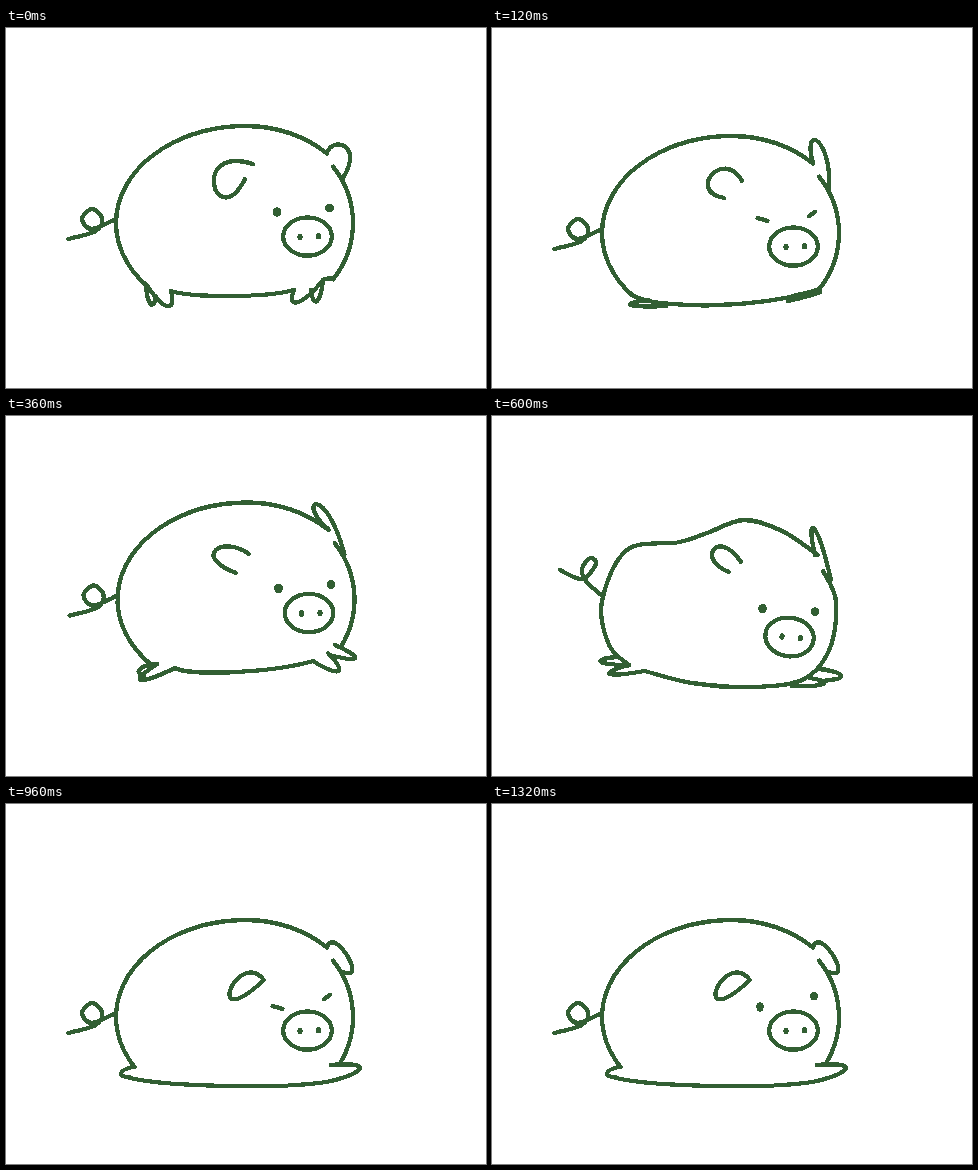
An HTML page with a canvas that plays this animation: 480 by 360 pixels, repeating every 1920 ms.

```html
<!DOCTYPE html>
<html lang="en">
<head>
<meta charset="utf-8">
<title>Resting pig</title>
<style>
  html, body { margin: 0; width: 100%; height: 100%; overflow: hidden; background: #fff; }
  canvas { display: block; width: 480px; height: 360px; }
</style>
</head>
<body>
<canvas id="stage" width="480" height="360"></canvas>
<script>
const ctx = document.getElementById('stage').getContext('2d', { willReadFrequently: true });
const INK = '#325f33';
const LOOP = 1920;
const TOP = 1.5 * Math.PI;
const SNOUT = [301.5, 208.5];
const EYES = [271, 184, 323.5, 180];
const TAIL = [62,211, 90,203, 96,190, 86,181, 76,191, 86,201, 110,191];

// shift: body offset; span: angles where the body outline meets the feet.
// ear: cubic; farEar: the two controls between fixed roots; feet: bows on the stage.
const stand = {
  shift: [0, 0], span: [2.45, 0.62],
  ear: [247,136, 183,116, 210,207, 239,151],
  farEar: [326,108, 358,116],
  feet: [
    [140,257, 144.5,276, 150,268], [141,257, 161,278, 165,263],
    [165,263, 225,268, 288,262],
    [288,262, 292,274, 317,252], [305,262, 311,273, 317,252], [327,251, 322,250.5, 317,252]
  ]
};
const crouch = {
  shift: [0, 10], span: [2.45, 0.62],
  ear: [250,143, 232,110, 194,153, 232,160],
  farEar: [310,84, 340,101],
  eyes: [270.5,181.5, 320,176], shut: true,
  feet: [
    [140,267, 225,277, 327,261],
    [156,272, 139,277, 174,278], [296,273, 328,264, 304,267]
  ]
};
const leap = {
  shift: [1.5, -11.5], span: [2.41, 0.5],
  ear: [241.5,149.5, 215,130, 184,152, 228.5,168.5],
  farEar: [287,96, 318,78],
  feet: [
    [151,248, 134,253, 138,260], [151,248, 135,264, 169,252],
    [169,252, 230,256, 307,245],
    [307,245, 332,255, 322,237], [324,239, 349,242, 329,229]
  ]
};
const land = {
  shift: [2, 14],
  outline: [
    [326,139, 290,115, 252,104, 215,117, 188,126, 135,134, 110,185, 117,229, 137,249],
    [153,255, 200,267, 262,271, 312,263, 338,232, 344,185, 331,155],
    [68,154, 90,163, 104,148, 98,142, 90,153, 94,165, 109,179]
  ],
  ear: [247,132, 225,98, 201,129, 235,142],
  farEar: [311,82, 323,89],
  head: [-6, -1.5], tilt: 0.133,
  feet: [
    [124,241, 109,246, 137,249], [137,249, 118,258, 153,255],
    [328,253, 349,260, 328,265], [300,270, 331,268, 318,262]
  ]
};
const flat = {
  shift: [0, 18], span: [2.6, 0.51],
  ear: [256,158, 238,143, 217,155, 250,167],
  farEar: [308,105, 325,94],
  eyes: [271.5,185.5, 321,175], shut: true,
  feet: [
    [127,263, 115,269, 124,273.5], [124,274, 225,282, 325,277],
    [325,277, 354,264, 325,261]
  ]
};
const settle = { ...flat, ear: [258,158, 231,125, 196,215, 258,158], farEar: [327,104, 363,160] };
const rest = { ...settle, eyes: [268,185, 322,174], shut: false, eyeWidth: 3.7 };

// Start time, pose, extra drop.
const scenes = [
  [0, stand], [120, crouch], [240, crouch, 5], [360, leap],
  [600, land], [840, flat], [960, settle], [1320, rest]
];

function line(build) {
  ctx.beginPath();
  build();
  ctx.stroke();
}

function cubic([x, y, ...rest]) {
  line(() => {
    ctx.moveTo(x, y);
    ctx.bezierCurveTo(...rest);
  });
}

// Rounded curve from a to b that passes through m halfway.
function bow([ax, ay, mx, my, bx, by]) {
  const cx = (8 * mx - ax - bx) / 6, cy = (8 * my - ay - by) / 6;
  const wx = 0.3 * (bx - ax), wy = 0.3 * (by - ay);
  cubic([ax, ay, cx - wx, cy - wy, cx + wx, cy + wy, bx, by]);
}

// Smooth curve through a few points.
function smooth(p) {
  const n = p.length / 2;
  const at = (i, k) => p[2 * Math.max(0, Math.min(n - 1, i)) + k];
  const lead = (i, s) => [0, 1].map(k => at(i, k) + s * (at(i + 1, k) - at(i - 1, k)) / 6);
  line(() => {
    ctx.moveTo(p[0], p[1]);
    for (let i = 0; i < n - 1; i++) {
      ctx.bezierCurveTo(...lead(i, 1), ...lead(i + 1, -1), at(i + 1, 0), at(i + 1, 1));
    }
  });
}

const arc = (rx, from, to) => ctx.ellipse(240, 195, rx, 97, 0, from, to);

function dot(x, y, rx, ry) {
  ctx.beginPath();
  ctx.ellipse(x, y, rx, ry, 0, 0, 2 * Math.PI);
  ctx.fill();
}

function dash(x, y, dx, dy) {
  line(() => {
    ctx.moveTo(x - dx, y - dy);
    ctx.lineTo(x + dx, y + dy);
  });
}

function drawFace({ head = [0, 0], tilt = 0, eyes = EYES, shut, eyeWidth = 4.4 }) {
  const [x, y] = SNOUT;
  ctx.translate(x + head[0], y + head[1]);
  ctx.rotate(tilt);
  line(() => ctx.ellipse(0, 0, 24.3, 19.2, 0, 0, 2 * Math.PI));
  dot(-7.5, 0.5, 2.6, 3.4);
  dot(11, -0.3, 2.6, 3.2);
  ctx.translate(-x, -y);
  if (shut) {
    dash(eyes[0], eyes[1], 5, 1.3);
    dash(eyes[2], eyes[3], 3, -2);
  } else {
    dot(eyes[0], eyes[1], eyeWidth, 4.8);
    dot(eyes[2], eyes[3], eyeWidth, 4.5);
  }
}

function drawPig(pose, drop) {
  ctx.save();
  ctx.translate(0, drop);
  pose.feet.forEach(bow);
  if (pose.outline) pose.outline.forEach(smooth);
  ctx.translate(...pose.shift);
  if (pose.span) {
    const [left, right] = pose.span;
    line(() => {
      arc(130, left, TOP);
      arc(116, TOP, 2 * Math.PI - 0.8);
    });
    line(() => arc(107, -0.62, right));
    smooth(TAIL);
  }
  cubic(pose.ear);
  cubic([321, 125, ...pose.farEar, 337, 150]);
  drawFace(pose);
  ctx.restore();
}

// Hard pixel edges, as from a pencil tool.
function sharpen() {
  const img = ctx.getImageData(0, 0, 480, 360);
  for (let i = 3; i < img.data.length; i += 4) img.data[i] = img.data[i] > 127 ? 255 : 0;
  ctx.putImageData(img, 0, 0);
}

function render([, pose, drop = 0]) {
  ctx.clearRect(0, 0, 480, 360);
  ctx.fillStyle = ctx.strokeStyle = INK;
  ctx.lineWidth = 4.3;
  ctx.lineCap = ctx.lineJoin = 'round';
  drawPig(pose, drop);
  sharpen();
}

const start = performance.now();
let shown;
function tick() {
  const t = (performance.now() - start) % LOOP;
  const scene = scenes.findLast(s => s[0] <= t);
  if (scene !== shown) render(shown = scene);
  requestAnimationFrame(tick);
}
tick();
</script>
</body>
</html>
```
